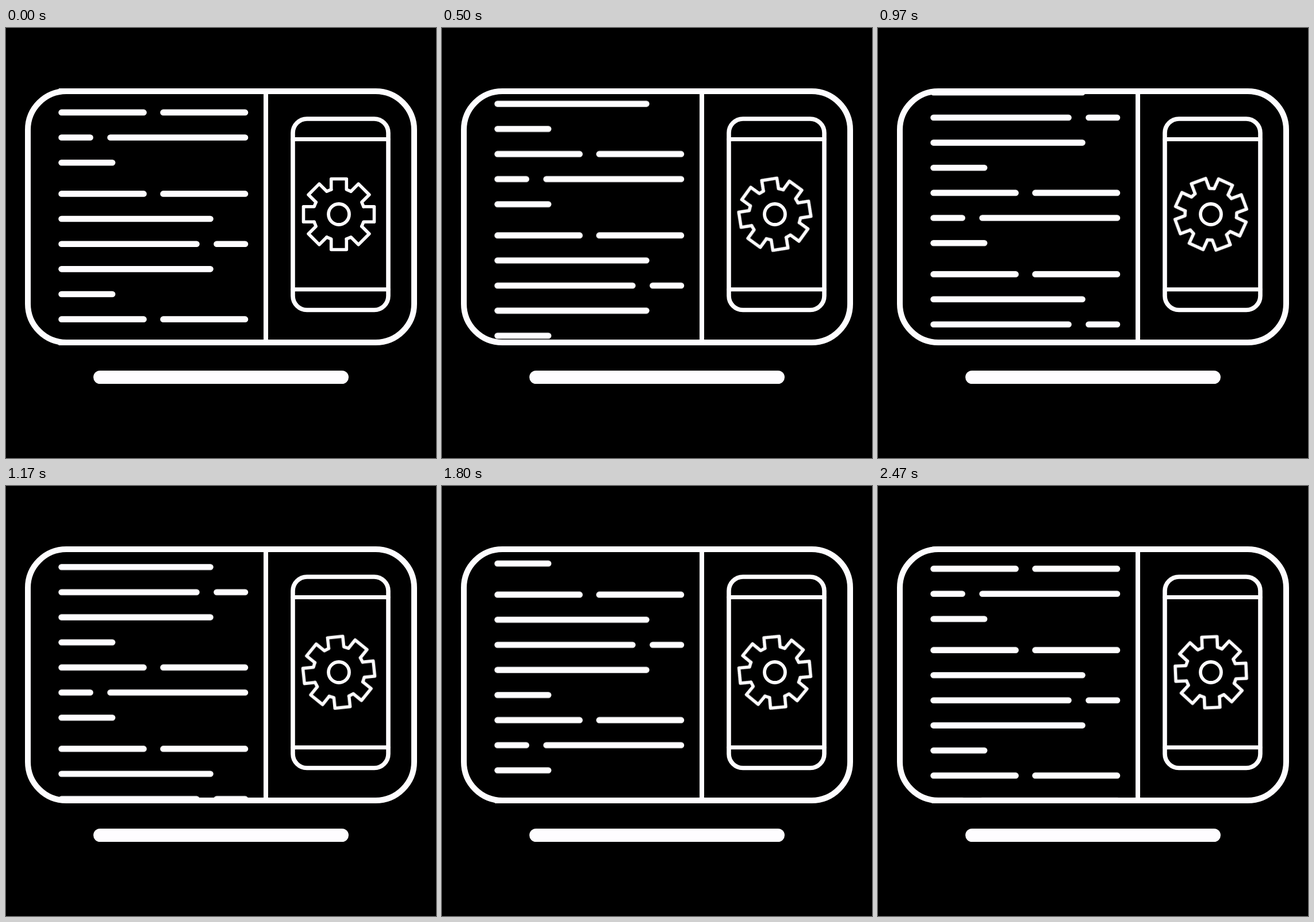
Animation, 748 px wide and 748 px high, one loop 2.5 s. Source, as an HTML page without scripts:

```html
<!DOCTYPE html>
<html lang="en">
<head>
<meta charset="utf-8">
<title>Code editor with app preview</title>
<style>
  html, body { margin: 0; width: 100%; height: 100%; overflow: hidden; background: #000; }
  svg { display: block; width: 100%; height: 100%; }
  .art { fill: none; stroke: #fefdff; stroke-linecap: round; stroke-linejoin: round; }
  .code, .gear { animation: 2500ms steps(75, end) -5ms infinite; }
  .code { animation-name: scroll; stroke-width: 10.6; }
  .gear { animation-name: spin; stroke-width: 5.6; }
  @keyframes scroll { to { transform: translateY(361.6px); } }
  @keyframes spin { to { transform: rotate(180deg); } }
</style>
</head>
<body>
<svg viewBox="0 0 748 748">
  <defs>
    <clipPath id="window"><rect x="60" y="105" width="390" height="447"/></clipPath>

    <path id="halves" d="M96.5 0H239.5M273.5 0H416"/>
    <path id="shortLong" d="M96.5 0H146.5M181.5 0H416"/>
    <path id="short" d="M96.5 0H185"/>
    <path id="long" d="M96.5 0H355.5"/>
    <path id="longShort" d="M96.5 0H331.5M366.5 0H416"/>

    <g id="block">
      <use href="#halves"/>
      <use href="#long" y="43.65"/>
      <use href="#longShort" y="87.3"/>
      <use href="#long" y="130.95"/>
      <use href="#short" y="174.6"/>
      <use href="#halves" y="218.25"/>
      <use href="#shortLong" y="261.9"/>
      <use href="#short" y="305.55"/>
    </g>

    <path id="tooth" d="M-13.3-43V-61.5H13.3V-43L21-39.8"/>
    <g id="toothPair">
      <use href="#tooth"/>
      <use href="#tooth" transform="rotate(45)"/>
    </g>
  </defs>

  <rect width="748" height="748"/>
  <g class="art">
    <g clip-path="url(#window)">
      <g class="code">
        <use href="#block" y="288.4"/>
        <use href="#block" y="-71.35"/>
        <use href="#block" y="-431.1"/>
      </g>
    </g>

    <!-- monitor -->
    <rect x="38" y="110" width="672" height="437" rx="67" stroke-width="10"/>
    <path d="M452 112V545" stroke-width="8"/>
    <path d="M163.5 607.5H584.5" stroke-width="23"/>

    <!-- phone -->
    <rect x="499" y="158" width="166" height="332.5" rx="24.5" stroke-width="7.6"/>
    <path d="M499 193.5H665M499 454.8H665" stroke-width="7"/>

    <g transform="translate(579 324)">
      <circle r="18" stroke-width="5.8"/>
      <g class="gear">
        <use href="#toothPair"/>
        <use href="#toothPair" transform="rotate(90)"/>
        <use href="#toothPair" transform="rotate(180)"/>
        <use href="#toothPair" transform="rotate(270)"/>
      </g>
    </g>
  </g>
</svg>
</body>
</html>
```
